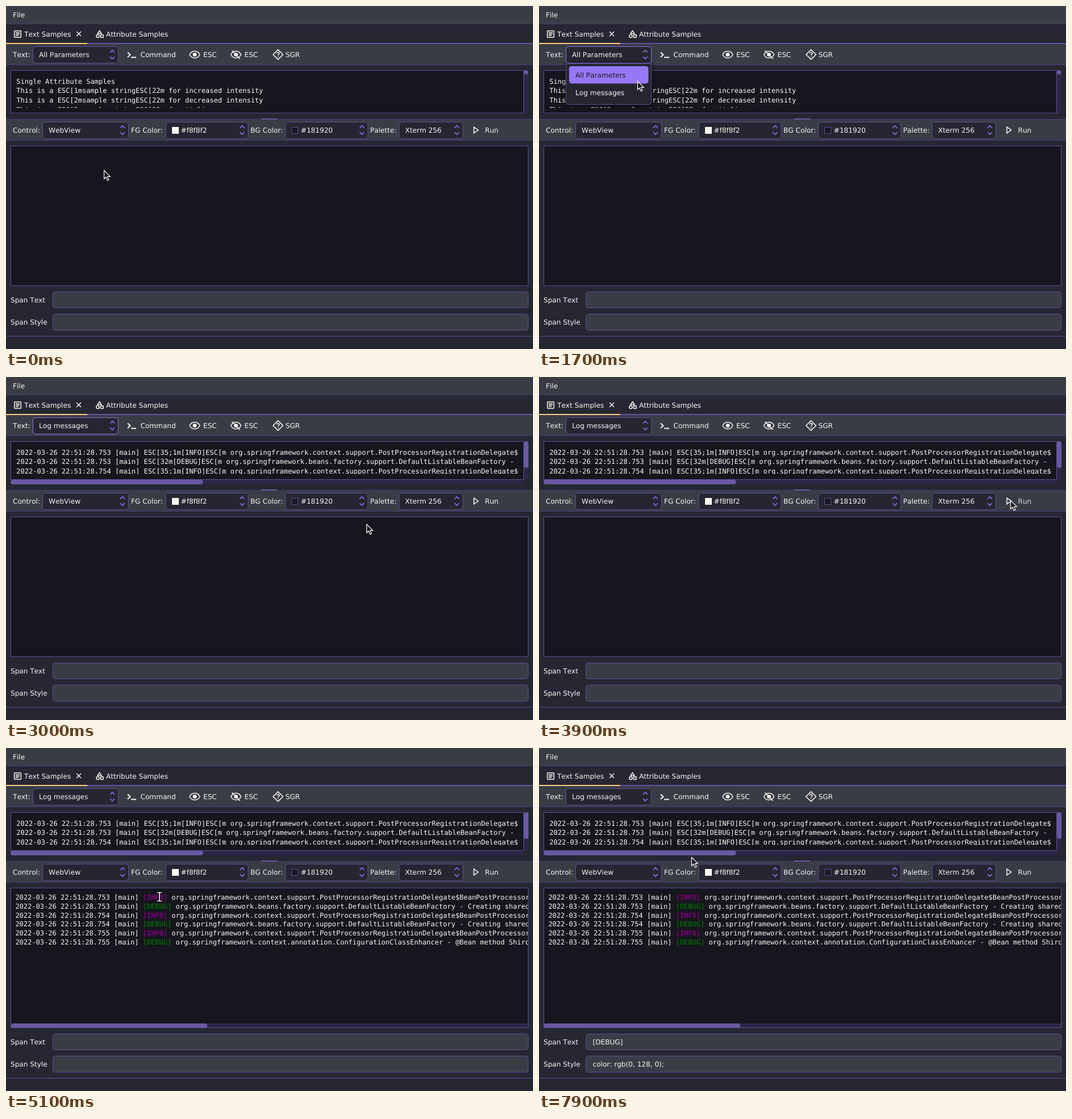
Write an HTML page that moves like this. It is 927x604 px and loops after 8 s.

```html
<!DOCTYPE html>
<html lang="en">
<head>
<meta charset="utf-8">
<title>Text Samples</title>
<style>
  html, body { margin: 0; width: 100%; height: 100%; overflow: hidden; background: #262732; }
  svg { display: block; width: 927px; height: 604px; }
  text {
    font: 12.1px "DejaVu Sans", sans-serif; font-kerning: none; fill: #f8f8f2;
    white-space: pre; text-rendering: geometricPrecision;
  }
  .mono text { font: 12.03px "DejaVu Sans Mono", monospace; }
  .mono .info { fill: #800080; font-weight: bold; }
  .mono .debug { fill: #008000; }
  .bar { fill: #3a3c45; }
  .edge { fill: #463e78; }
  .well { fill: #16161e; stroke: #5e4f98; }
  .box { fill: #252631; stroke: #5e4f98; }
  .field { fill: #3a3c45; stroke: #5e4f98; }
  .focus { fill: none; stroke: #8b70e6; }
  .track { fill: #2d2647; }
  .thumb { fill: #6959a2; }
  .arrows { fill: none; stroke: #8069d8; stroke-width: 1.8; }
  .icon { fill: none; stroke: #f8f8f2; stroke-width: 1.5; }
  .hot { fill: #9678f5; }
  .dark { fill: #1b1a26; }
  .popup { filter: drop-shadow(0 1px 4px #0009); }
</style>
</head>
<body>
<svg id="stage" viewBox="0 0 927 604"></svg>
<script>
const LOOP = 8000, STEP = 100;

const text = (x, y, s, cls = '') => `<text x="${x}" y="${y}" class="${cls}">${s}</text>`;
const rect = (cls, x, y, w, h, r = 0) =>
  `<rect class="${cls}" x="${x}" y="${y}" width="${w}" height="${h}" rx="${r}"/>`;
const frame = (cls, x, y, w, h, r = 0) => rect(cls, x + .5, y + .5, w - 1, h - 1, r);
const icon = (x, y, body) => `<g class="icon" transform="translate(${x} ${y})">${body}</g>`;
const during = (from, to, body) => `<g data-from="${from}" data-to="${to}">${body}</g>`;

const combo = (x, y, w, label, pad = 11) =>
  frame('box', x, y, w, 30, 4.5) + text(x + pad, y + 19, label) +
  `<path class="arrows" transform="translate(${x + w - 11} ${y + 14.5})" d="M-4-3.7L0-7.7L4-3.7M-4 3.7L0 7.7L4 3.7"/>`;

// Log content
const stamp = ms => `2022-03-26 22:51:28.${ms} [main] `;
const spring = 'org.springframework.';
const info = spring + 'context.support.PostProcessorRegistrationDelegate$';
const debug = spring + 'beans.factory.support.DefaultListableBeanFactory - ';
const bean = spring + 'context.annotation.ConfigurationClassEnhancer - @Bean method ShiroConfig';
const rawInfo = ms => stamp(ms) + 'ESC[35;1m[INFO]ESC[m ' + info;
const rawDebug = ms => stamp(ms) + 'ESC[32m[DEBUG]ESC[m ' + debug;
const webInfo = ms => stamp(ms) + `<tspan class="info">[INFO]</tspan> ${info}BeanPostProcessorChecker`;
const webDebug = (ms, msg) => stamp(ms) + `<tspan class="debug">[DEBUG]</tspan> ${msg}`;
const lines = (x, y, gap, list) => list.map((s, i) => text(x, y + i * gap, s)).join('');

const samples = [
  'Single Attribute Samples',
  'This is a ESC[1msample stringESC[22m for increased intensity',
  'This is a ESC[2msample stringESC[22m for decreased intensity',
  'This is a ESC[3msample stringESC[23m for italic'
];
const rawLog = [rawInfo(753), rawDebug(753), rawInfo(754)];
const shared = debug + 'Creating shared instance';
const webLog = [webInfo(753), webDebug(753, shared), webInfo(754), webDebug(754, shared),
  webInfo(755), webDebug(755, bean)];

const eye = '<path d="M1 0C5-8 15-8 19 0C15 8 5 8 1 0Z"/><circle cx="10" r="2.6" fill="#f8f8f2"/>';

const header =
  rect('bar', 0, 0, 927, 31) + rect('edge', 0, 31, 927, 1) + text(12, 19.5, 'File') +
  icon(14, 43, '<rect x=".7" y=".7" width="11.6" height="11.6" rx="1"/><path d="M3 4H10M3 6.5H10M3 9H8"/>') +
  text(32, 54, 'Text Samples') + icon(128, 49, '<path d="M-4-4L4 4M4-4L-4 4"/>') +
  icon(158, 42, '<path d="M6.5 1.5L10 6.5H3Z"/><circle cx="3.4" cy="11" r="2.6"/><rect x="8.5" y="8.8" width="4.6" height="4.6"/>') +
  text(176, 54, 'Attribute Samples') +
  '<rect x="0" y="65" width="927" height="2" fill="#6351a3"/><rect x="0" y="65" width="143" height="2" fill="#ffca80"/>';

const tools =
  rect('bar', 0, 67, 927, 36) + rect('edge', 0, 103, 927, 1) + text(12, 90, 'Text:') +
  during(0, 1900, combo(47, 71, 151, 'All Parameters')) +
  during(1900, LOOP, combo(47, 71, 151, 'Log messages')) +
  during(1100, 3900, frame('focus', 47, 71, 151, 30, 4.5)) +
  icon(213, 81, '<path stroke-width="2" d="M1 .5L5.5 4.8L1 9M7 9.5H16"/>') + text(236.5, 90, 'Command') +
  icon(322, 85.5, eye) + text(347, 90, 'ESC') +
  icon(394.5, 85.5, eye + '<path d="M3-7L17 7.5"/>') + text(419.5, 90, 'ESC') +
  icon(478.5, 85.5, '<path stroke-linejoin="round" d="M0-8.6L8.8 0L0 8.6L-8.8 0Z"/>' +
    '<path d="M-2.2-2C-2-4.6 2.4-4.4 2.2-1.8C2 0 0 0 0 1.6M0 3V4.5"/>') +
  text(491.5, 90, 'SGR');

const input =
  during(0, 1900,
    frame('well', 8, 113, 903, 76) +
    rect('track', 911, 113, 8, 76, 4) +
    `<g class="mono" clip-path="url(#tall)">${lines(18.3, 136.5, 16.8, samples)}</g>`) +
  during(1900, LOOP,
    frame('well', 8, 113, 903, 68) +
    rect('track', 911, 113, 8, 68, 4) + rect('track', 8, 181, 903, 8, 4) + rect('thumb', 8, 181, 338.5, 8, 4) +
    `<g class="mono" clip-path="url(#short)">${lines(18.3, 136.5, 16.8, rawLog)}</g>`) +
  during(0, 2900, '<circle class="thumb" cx="914.8" cy="116.8" r="3.8"/>') +
  during(2900, LOOP, rect('thumb', 911, 113, 8, 47, 4));

const controls =
  rect('edge', 0, 199, 927, 1) + rect('bar', 0, 200, 927, 36) + rect('edge', 0, 236, 927, 1) +
  rect('thumb', 449, 198, 28, 2) +
  text(12, 223, 'Control:') + combo(64, 204, 152, 'WebView') +
  text(220, 223, 'FG Color:') + combo(280.5, 204, 146, '#f8f8f2', 27) +
  '<rect x="292" y="213" width="12" height="12" fill="#f8f8f2"/>' +
  text(430, 223, 'BG Color:') + combo(491, 204, 146, '#181920', 27.5) +
  '<rect x="502.5" y="213.5" width="11" height="11" fill="#181920" stroke="#5e4f98"/>' +
  text(640.5, 223, 'Palette:') + combo(691, 204, 113, 'Xterm 256') +
  icon(822, 218.5, '<path d="M1-5.3L8.6 0L1 5.3Z"/>') +
  `<g id="run">${text(842.5, 223, 'Run')}</g>`;

const output =
  frame('well', 8, 246, 911, 247) +
  during(4100, LOOP,
    `<g class="mono" clip-path="url(#web)">${lines(16.4, 267, 15.8, webLog)}</g>` +
    rect('track', 9, 485, 909, 7) + rect('thumb', 9, 485, 345, 8, 4));

const spans =
  text(8, 522, 'Span Text') + frame('field', 82, 503, 837, 29, 4) +
  text(8, 561, 'Span Style') + frame('field', 82, 542, 837, 29.5, 4) +
  during(5500, 7000, text(94.5, 522, '[INFO]') +
    text(94.5, 561, 'color: rgb(128, 0, 128);background-color: rgb(24, 25, 32);font-weight: bold;')) +
  during(7000, LOOP, text(94.5, 522, '[DEBUG]') + text(94.5, 561, 'color: rgb(0, 128, 0);')) +
  '<rect x="0" y="581" width="927" height="1" fill="#5e4f98"/>';

const popup = during(1200, 1900,
  `<g class="popup">${frame('box', 47, 101, 151, 73, 4)}</g>` +
  during(1200, 1800, rect('hot', 53, 106, 139.5, 30.5, 4.5)) +
  during(1800, 1900, rect('hot', 53, 137, 139.5, 30.5, 4.5)) +
  during(1200, 1800, text(64, 125.5, 'All Parameters', 'dark') + text(64, 156.5, 'Log messages')) +
  during(1800, 1900, text(64, 125.5, 'All Parameters') + text(64, 156.5, 'Log messages', 'dark')));

const pointer =
  `<g id="cursor">
    <path id="arrow" d="M.5 .5V15.3L3.8 12.3L6.3 18L9 16.9L6.5 11.4H11.3Z" fill="#16161e" stroke="#fff" stroke-width="1.2"/>
    <g id="beam" fill="none">
      <path d="M-4-7.5H4M-4 7.5H4M0-7V7" stroke="#000" stroke-width="3.4"/>
      <path d="M-4-7.5H4M-4 7.5H4M0-7V7" stroke="#fff" stroke-width="1.6"/>
    </g>
  </g>`;

const clip = (id, x, y, w, h) => `<clipPath id="${id}">${rect('', x, y, w, h)}</clipPath>`;
const stage = document.getElementById('stage');
stage.innerHTML =
  `<defs>${clip('tall', 18, 122, 884, 57.5)}${clip('short', 18, 122, 884, 49)}${clip('web', 9, 247, 909, 238)}</defs>` +
  header + tools + input + controls + output + spans + popup + pointer;

// Cursor moves: first step, last step, end x, end y
const moves = [
  [100, 100, 172, 287], [300, 400, 176, 149], [600, 900, 190, 88],
  [1500, 1500, 191, 111], [1700, 1700, 173, 132], [1800, 1800, 172, 148],
  [2000, 2100, 157, 142], [2300, 2400, 156, 178], [2600, 2700, 504, 287],
  [2900, 3300, 829, 217], [4100, 4700, 327, 312], [4800, 4800, 278, 280],
  [4900, 4900, 287, 292], [5100, 5100, 270, 262], [5600, 5800, 284, 310],
  [6100, 6100, 287, 324], [6200, 6400, 273, 277], [6600, 6700, 286, 277],
  [7000, 7200, 279, 315], [7400, 7500, 318, 370], [7600, 7600, 312, 401],
  [7800, 7900, 268, 192]
];

function cursorAt(t) {
  let x = 172, y = 289;
  for (const [from, to, nx, ny] of moves) {
    if (t < from) break;
    const k = Math.min(1, (t - from + STEP) / (to - from + STEP));
    x += (nx - x) * k;
    y += (ny - y) * k;
  }
  return [Math.round(x), Math.round(y)];
}

const find = id => document.getElementById(id);
const cursor = find('cursor'), arrow = find('arrow'), beam = find('beam'), run = find('run');
const timed = [...stage.querySelectorAll('[data-from]')].map(el => [el, +el.dataset.from, +el.dataset.to]);

function draw() {
  const t = Math.floor(performance.now() % LOOP / STEP) * STEP;
  for (const [el, from, to] of timed) el.style.display = t >= from && t < to ? '' : 'none';
  const [x, y] = cursorAt(t);
  const open = t >= 1200 && t < 1900;
  const overInput = y > 113 && y < 176 && x < 911 && !open;
  const overLog = t >= 4100 && y > 253 && y < 350;
  const isBeam = overInput || overLog;
  arrow.style.display = isBeam ? 'none' : '';
  beam.style.display = isBeam ? '' : 'none';
  cursor.setAttribute('transform', `translate(${x} ${y})`);
  run.setAttribute('opacity', t >= 3900 && t < 4000 ? .8 : 1);
  requestAnimationFrame(draw);
}
draw();
</script>
</body>
</html>
```
